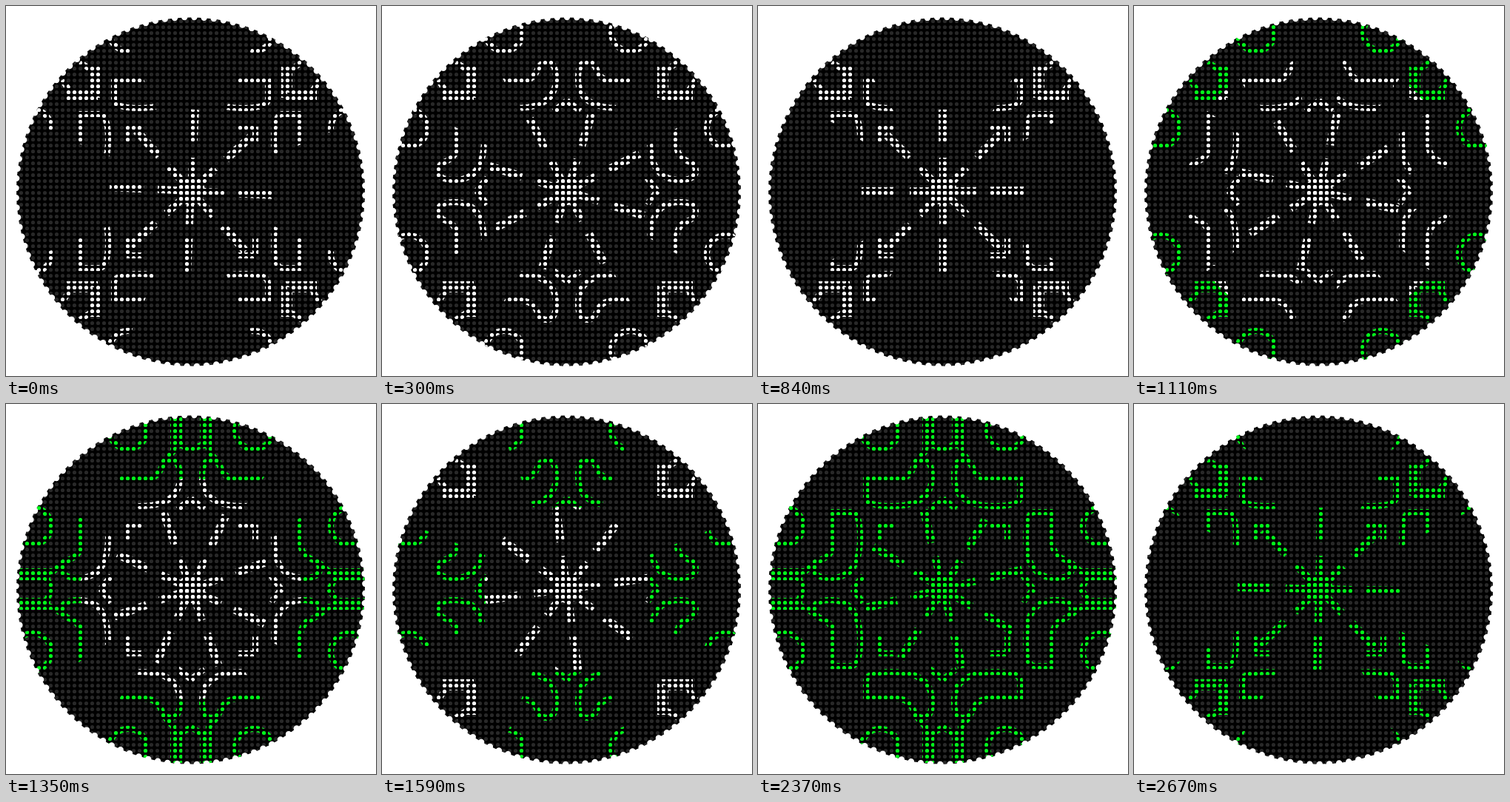
An HTML page with a canvas that plays this animation: 500 px wide and 500 px high, repeating every 2700 ms.

```html
<!DOCTYPE html>
<html>
<head>
<meta charset="utf-8">
<style>
html, body { margin: 0; width: 100%; height: 100%; overflow: hidden; background: #fff; }
canvas { display: block; }
</style>
</head>
<body>
<canvas id="stage" width="500" height="500"></canvas>
<script>
const ctx = document.getElementById('stage').getContext('2d');
const TAU = Math.PI * 2, DEG = TAU / 360;
const LOOP = 2700, TURN = 900, STEP = 30;
const SIZE = 500, MID = 250, RADIUS = 235.5, TEETH = 112, PITCH = 8;
const WHITE = '#fff', GREEN = '#00ff1a';

// Each line is drawn for one eighth and mirrored around the middle.
const mirrored = line => {
  const all = new Path2D(), one = new Path2D(line);
  for (const x of [-1, 1]) for (const y of [-1, 1]) {
    all.addPath(one, new DOMMatrix([x, 0, 0, y, 0, 0]));
    all.addPath(one, new DOMMatrix([0, y, x, 0, 0, 0]));
  }
  return all;
};
const beans = mirrored('M104 148H64Q46 148 40 164Q36 174 27 174Q15 174 15 152Q15 112 70 112Q104 112 104 124Z');
const rings = mirrored('M110 214a25 25 0 1 0 -50 0a25 25 0 1 0 50 0');
const corners = mirrored('M150 174L138 166H126V126M133 166V133');
const columns = mirrored('M16 235V190M24 235V186L38 170M16 196L0 187');
const chevrons = mirrored('M18 108L0 122');
const squares = mirrored('M87 64V87');

const disc = new Path2D();
disc.arc(-0.5, 1, RADIUS, 0, TAU);
const holes = new Path2D();
for (let y = 4.5; y < SIZE; y += PITCH) {
  for (let x = 4.5; x < SIZE; x += PITCH) addDot(holes, x - MID, y - MID, 2.6);
}

function addDot(path, x, y, r) {
  path.moveTo(x + r, y);
  path.arc(x, y, r, 0, TAU);
}

const between = (t, a, b) => t > a && t < b;
const rise = (t, a, b) => Math.min(1, Math.max(0, (t - a) / (b - a)));

// Wedges lying between two angles on either side of each diagonal.
function wedges(inner, outer) {
  const path = new Path2D();
  for (let diagonal = 45; diagonal < 360; diagonal += 90) {
    for (const side of [-1, 1]) {
      path.moveTo(0, 0);
      path.arc(0, 0, SIZE, (diagonal + side * inner) * DEG, (diagonal + side * outer) * DEG, side < 0);
      path.closePath();
    }
  }
  return path;
}

// White inside the front, green outside it.
function frontColor(t) {
  if (t < TURN) return WHITE;
  const front = 361 - t * 0.157;
  if (front < 90) return GREEN;
  const color = ctx.createRadialGradient(0, 0, 0, 0, 0, MID);
  color.addColorStop(front / MID, WHITE);
  color.addColorStop(front / MID, GREEN);
  return color;
}

function drawRays(angle) {
  ctx.save();
  ctx.rotate(angle);
  ctx.beginPath();
  ctx.arc(0, 0, 19, 0, TAU);
  for (let i = 0; i < 8; i++) {
    ctx.fillRect(0, -5, 45, 10);
    ctx.fillRect(64, -5.5, 46, 11);
    ctx.rotate(TAU / 8);
  }
  ctx.fill();
  ctx.restore();
}

function drawBands(phase) {
  const sweep = (phase + 150) % TURN;
  const bump = Math.sin(Math.PI * rise(sweep, 270, 720));
  const inner = 16 * bump + 45 * rise(sweep, 780, 900);
  const outer = 22 * rise(sweep, 0, 150) + 23 * rise(sweep, 240, 460);
  ctx.save();
  ctx.clip(wedges(inner, outer));
  ctx.stroke(beans);
  ctx.stroke(rings);
  ctx.restore();
}

function drawTeeth(angle) {
  ctx.fillStyle = WHITE;
  ctx.beginPath();
  for (let i = 0; i < TEETH; i++) {
    const a = angle + (i + 0.5) * TAU / TEETH;
    addDot(ctx, 236 * Math.cos(a) - 0.5, 236 * Math.sin(a) + 1, 4.2);
  }
  ctx.fill();
}

function draw(t) {
  const phase = t % TURN, angle = (2.8 + t * 0.05) * DEG;
  ctx.setTransform(1, 0, 0, 1, MID, MID);
  ctx.fillStyle = WHITE;
  ctx.fillRect(-MID, -MID, SIZE, SIZE);
  ctx.fillStyle = '#000';
  ctx.fill(disc);

  ctx.save();
  ctx.clip(disc);
  ctx.clip(holes);
  ctx.fillStyle = '#282828';
  ctx.fillRect(-MID, -MID, SIZE, SIZE);
  ctx.fillStyle = ctx.strokeStyle = frontColor(t);
  ctx.lineWidth = 8;
  drawRays(angle);
  drawBands(phase);
  if (between(phase, 400, 660)) ctx.stroke(columns);
  if (between(phase, 170, 780)) ctx.stroke(chevrons);
  if (!between(phase, 150, 420) && !between(phase, 630, 800)) ctx.stroke(squares);
  if (between(t, 1400, 1760)) ctx.strokeStyle = WHITE;
  if (!between(phase, 390, 640)) ctx.stroke(corners);
  ctx.restore();
  drawTeeth(angle);
}

const start = performance.now();
function tick() {
  const t = (performance.now() - start) % LOOP;
  draw(Math.floor(t / STEP) * STEP);
  requestAnimationFrame(tick);
}
tick();
</script>
</body>
</html>
```
